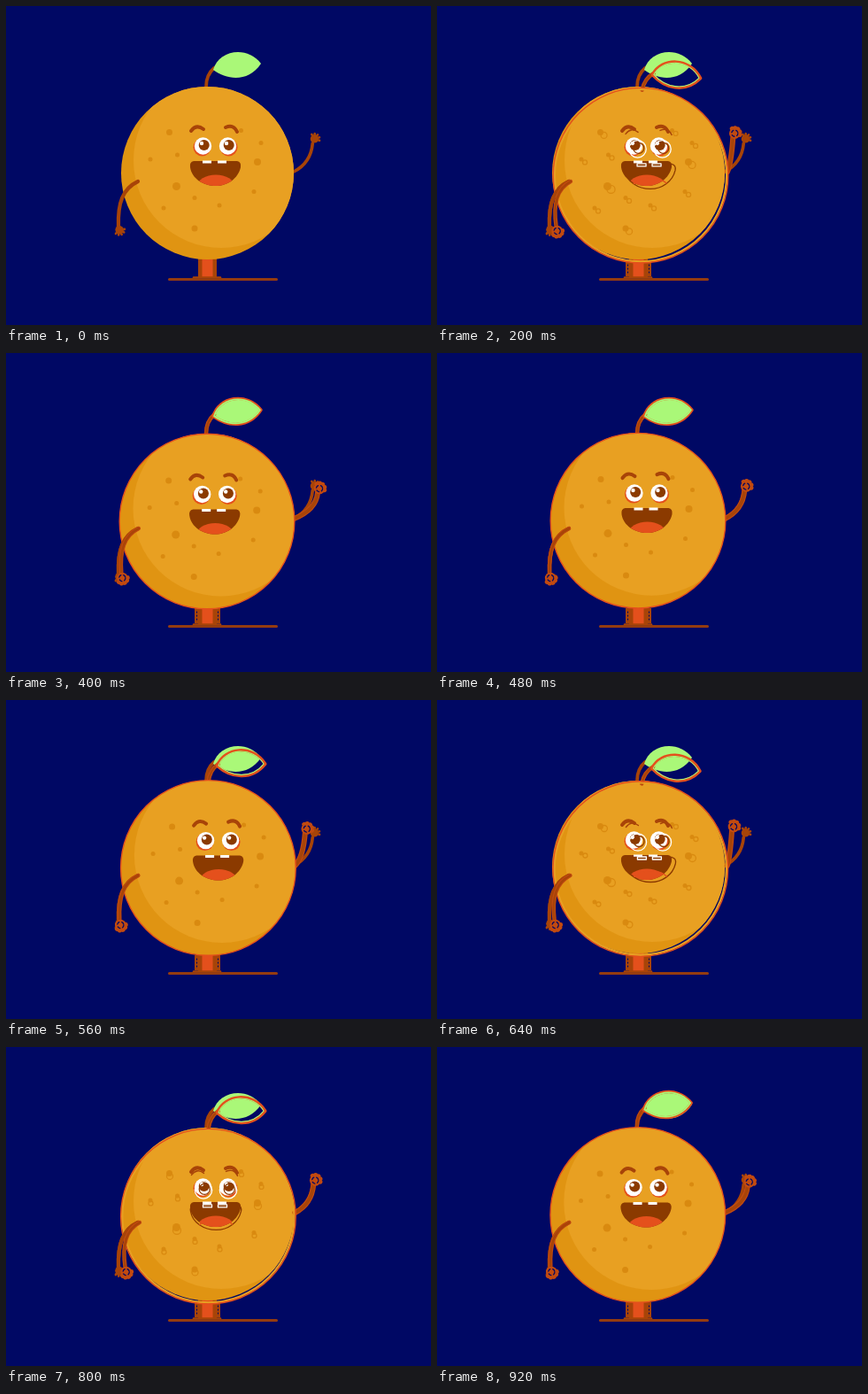
An HTML page with a canvas that plays this animation: 480x360 px, repeating every 0.96 s.

```html
<!DOCTYPE html>
<html>
<head>
<meta charset="utf-8">
<style>
html, body { margin: 0; overflow: hidden; background: #000864; }
canvas { display: block; }
</style>
</head>
<body>
<canvas id="stage" width="480" height="360"></canvas>
<script>
const ctx = document.getElementById('stage').getContext('2d');
const NAVY = '#000864', SKIN = '#e8a022', SHADE = '#e09412', SPOT = '#d98a10';
const BROWN = '#a84408', DARK = '#8b3a00', RED = '#e4501c', RUST = '#c24a10', LEAF = '#aaf878';
const LOOP = 960, HOLD = 200, STEP = 40, SWAY = 480;

const leaf = new Path2D('M234 72 C240 50 272 44 288 65 C274 86 250 84 234 72Z');
const stalk = new Path2D('M226 91 C226 84 228 76 235 70');
const mouth = new Path2D('M212 175 H261 Q266 176 265 182 C262 195 250 203 237 203 C223 203 210 195 208 182 Q207 176 212 175Z');
const brows = new Path2D('M209 141 Q215 133 223 139 M248 137 Q257 133 261 142');
const teeth = new Path2D('M222 174.5 h10 v3 h-10Z M239 174.5 h10 v3 h-10Z');
const spots = [[184.5, 142.5, 3.5], [163, 173, 2.5], [193.5, 168, 2.5], [192.5, 203.5, 4.5],
  [213, 216.5, 2.5], [178, 228, 2.5], [213, 251, 3.5], [241, 225, 2.5],
  [280, 209.5, 2.5], [284, 176, 4], [288, 154.5, 2.5], [265.5, 140.5, 2.5]];

function circle(x, y, r) {
  const path = new Path2D();
  path.arc(x, y, r, 0, 7);
  return path;
}

function line(path, color, width, dash = []) {
  ctx.setLineDash(dash);
  ctx.strokeStyle = color;
  ctx.lineWidth = width;
  ctx.stroke(path);
}

function shape(path, color, outlined) {
  if (outlined) return line(path, color, 1.3);
  ctx.fillStyle = color;
  ctx.fill(path);
}

// Draws at an offset, turned around the foot of the stalk
function at(x, y, draw, degrees = 0) {
  ctx.save();
  ctx.translate(x + 226, y + 91);
  ctx.rotate(degrees * Math.PI / 180);
  ctx.translate(-226, -91);
  draw();
  ctx.restore();
}

function clipped(path, draw) {
  ctx.save();
  ctx.clip(path);
  draw();
  ctx.restore();
}

function body(x, y, r) {
  const disc = circle(x, y, r);
  shape(disc, SHADE);
  clipped(disc, () => shape(circle(x + 15.5, y - 14.5, 99), SKIN));
}

function face(outlined) {
  for (const spot of spots) shape(circle(...spot), SPOT, outlined);
  line(brows, BROWN, outlined ? 1.5 : 4);
  for (const [x, side] of [[222.5, -1], [250.5, 1]]) {
    if (!outlined) shape(circle(x + side, 159.5, 10), RED);
    shape(circle(x, 158, 9.7), '#fff', outlined);
    shape(circle(x + 1.2, 157, 6), DARK, outlined);
    if (!outlined) shape(circle(x - 1.5, 155, 2.2), '#fff');
  }
  shape(mouth, DARK, outlined);
  const tongue = new Path2D();
  tongue.ellipse(237, 203, 21, 12.5, 0, 0, 7);
  clipped(mouth, () => shape(tongue, RED, outlined));
  shape(teeth, '#fff', outlined);
}

function hand(x, y, direction, outlined) {
  const fingers = new Path2D();
  for (let i = -2; i <= 2; i++) {
    const a = direction + i * 0.6;
    fingers.moveTo(x, y);
    fingers.lineTo(x + 6 * Math.cos(a), y + 6 * Math.sin(a));
  }
  if (outlined) {
    line(fingers, RUST, 5);
    shape(circle(x, y, 6.3), RUST);
    line(circle(x, y, 3.6), NAVY, 1.3, [3, 3]);
  } else {
    line(fingers, BROWN, 2.6);
    shape(circle(x, y, 4.6), BROWN);
  }
}

function rightArm(swing, shift, outlined) {
  const x = 344.5 - 9.5 * swing, y = 148 - 5 * swing;
  const arm = new Path2D(`M${325 + shift} 187 Q${x - 4} 177 ${x - 2} ${y + 5}`);
  if (outlined) line(arm, RUST, 6);
  line(arm, BROWN, 3.6);
  hand(x, y, -0.9, outlined);
}

function leftArm(shift, outlined) {
  const arm = new Path2D(`M${149 + shift / 4} 198 C${132 + shift / 2} 206 ${126 + shift * .6} 222 ${127 + shift} 249`);
  if (outlined) line(arm, RUST, 4.5);
  line(arm, BROWN, outlined ? 2.5 : 4.2);
  hand(128 + shift, outlined ? 254 : 252.5, 1.1, outlined);
}

function legs(moving) {
  ctx.fillStyle = BROWN;
  if (moving) ctx.fillRect(213, 288, 29, 17);
  ctx.fillRect(217, 284, 21, 22);
  ctx.fillStyle = RED;
  ctx.fillRect(221.5, 284, 12, 22);
  if (moving) line(new Path2D('M215.5 292 V304 M239.5 292 V304'), NAVY, 1.2, [1, 3]);
  line(new Path2D('M212 306.5 H242'), BROWN, 2.6);
  line(new Path2D('M184.5 308.5 H305.5'), '#943c10', 3);
}

// Cosine sway with its maximum at the given time
const wave = (time, peak) => Math.cos((time - peak) / SWAY * 2 * Math.PI);

function echoes(time) {
  const sway = 0.5 + 0.5 * wave(time, 680);
  const lean = wave(time, 640), sink = wave(time, 740);
  const phase = time % SWAY;
  const settled = phase < 120 || phase >= 400;
  const x = 226.8 + 3.2 * sway, y = 190.3 + 1.2 * sink;

  at(6 * sway - 0.3, 4.5 * sway - 0.8, () => {
    line(stalk, RUST, 4.5);
    line(stalk, BROWN, 2.2);
    line(leaf, RED, 3.4);
    clipped(leaf, () => line(leaf, LEAF, 3.6));
    if (sway > 0.2) line(leaf, RED, 1.5);
  }, 12.5 * sway - 1);

  rightArm(lean, 3 * sway, true);
  if (settled) body(x, y, 98.8);
  else line(circle(x, y, 97.2), SKIN, 2.4);
  line(circle(x, y, 98.8), RED, 1.4);
  at(1.8 + 2.6 * lean, 2 + 2 * sink, () => face(!settled));
  leftArm(0);
  leftArm(4.5 + 4.5 * sink, true);
}

function draw(now) {
  const time = Math.floor(now % LOOP / STEP) * STEP;
  const moving = time >= HOLD;
  ctx.fillStyle = NAVY;
  ctx.fillRect(0, 0, 480, 360);
  ctx.lineCap = ctx.lineJoin = 'round';
  legs(moving);
  line(stalk, BROWN, 3.8);
  shape(leaf, LEAF);
  rightArm(-0.4, 0);
  body(227.5, 188.5, 97.5);
  face();
  leftArm(0);
  if (moving) echoes(time);
  requestAnimationFrame(() => draw(performance.now() - start));
}

const start = performance.now();
draw(0);
</script>
</body>
</html>
```
